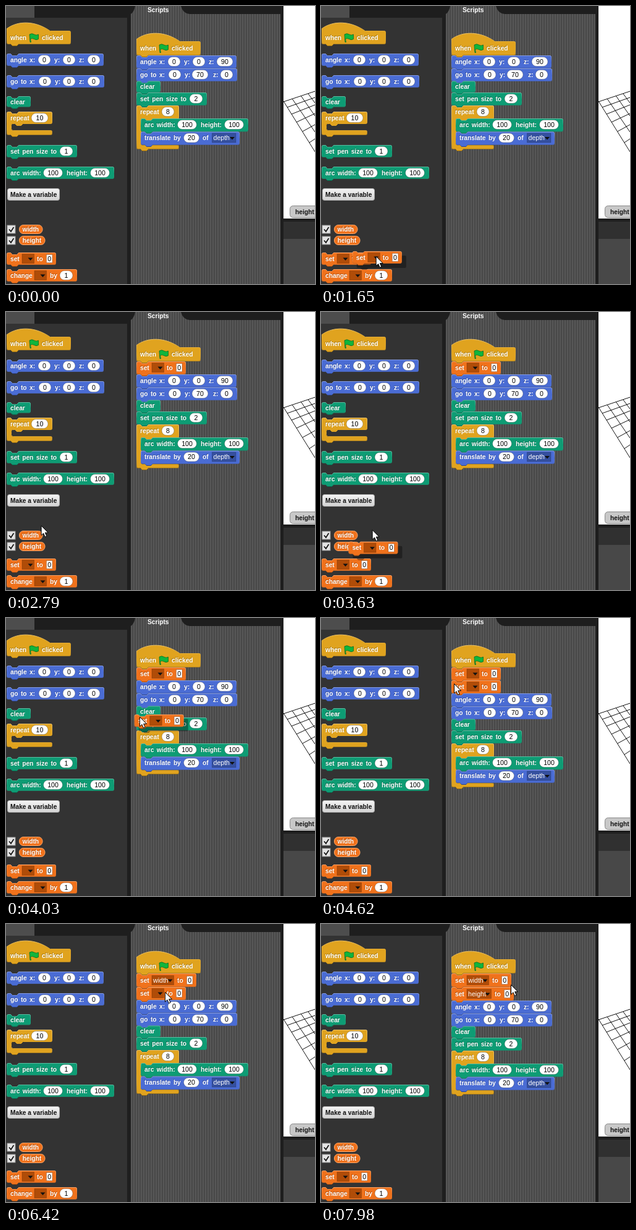
Animation, 500 px wide and 450 px high, one loop 8000 ms. Source, as an HTML page:

```html
<!DOCTYPE html>
<html lang="en">
<head>
<meta charset="utf-8">
<title>Block editor</title>
<style>
  html, body { margin: 0; width: 100%; height: 100%; overflow: hidden; background: #1e1e1e; }
  svg { display: block; width: 500px; height: 450px; }
  text { font-family: "Liberation Sans", Arial, sans-serif; font-size: 10.2px; white-space: pre; }
  .label { font-weight: bold; word-spacing: 1.6px; }
  .value { font-size: 10.6px; }
</style>
</head>
<body>
<svg id="stage" viewBox="0 0 500 450" xmlns="http://www.w3.org/2000/svg"></svg>
<script>
const LOOP = 8000;
const BLUE = '#4a6cd4', GREEN = '#0e9c74', GOLD = '#e0a31f', ORANGE = '#f0721c';
const DARK = { [BLUE]: '#35509f', [GREEN]: '#086a4e', [GOLD]: '#a87a12', [ORANGE]: '#b04c08' };

// ---- small drawing helpers ----
const rect = (x, y, w, h, fill, more = '') =>
  `<rect x="${x}" y="${y}" width="${w}" height="${h}" fill="${fill}" ${more}/>`;
const path = (d, fill, more = '') => `<path d="${d}" fill="${fill}" ${more}/>`;
const text = (x, y, str, fill, cls = 'label', more = '') =>
  `<text x="${x}" y="${y}" fill="${fill}" class="${cls}" ${more}>${str}</text>`;
const at = (x, y, body, id = '') => `<g ${id && `id="${id}"`} transform="translate(${x} ${y})">${body}</g>`;

// ---- block outlines ----
const notch = 'l3,3 h7 l3,-3';
const bump = 'l-3,3 h-7 l-3,-3';
const foot = (w, h) => `V${h - 2} Q${w},${h} ${w - 2},${h} H19 ${bump} H2 Q0,${h} 0,${h - 2} Z`;
const head = w => `M0,2 Q0,0 2,0 H6 ${notch} H${w - 2} Q${w},0 ${w},2`;
const stackShape = (w, h) => `${head(w)} ${foot(w, h)}`;
const hatShape = (w, h) => `M0,9 C18,-4 46,-4 70,13 H${w - 2} Q${w},13 ${w},15 ${foot(w, h)}`;
const loopShape = (top, mouth) => (w, h) =>
  `${head(w)} V${top - 2} Q${w},${top} ${w - 2},${top} H26 ${bump} H9 Q7,${top} 7,${top + 3}
   V${top + mouth - 3} Q7,${top + mouth} 10,${top + mouth} H${w - 2} Q${w},${top + mouth} ${w},${top + mouth + 2} ${foot(w, h)}`;

// ---- block contents, positioned relative to the block ----
const label = (x, str) => (cy, color) =>
  text(x - .7, cy + 2.9, str, DARK[color]) + text(x, cy + 3.6, str, '#fff');
const num = (cx, w, str) => cy =>
  rect(cx - w / 2, cy - 7.5, w, 15, '#fff', 'rx="7.5" stroke="#000" stroke-opacity=".3" stroke-width=".8"') +
  text(cx, cy + 3.8, str, '#000', 'value', 'text-anchor="middle"');
const slot = (x, str) => cy =>
  rect(x, cy - 6.5, 9.5, 13, '#fff', 'stroke="#000" stroke-opacity=".3" stroke-width=".8"') +
  text(x + 1.8, cy + 3.8, str, '#000', 'value');
const drop = (x, w, str = '') => (cy, color) =>
  rect(x, cy - 7.5, w, 15, DARK[color], 'stroke="#000" stroke-opacity=".2"') +
  text(x + 2, cy + 3.8, str, '#fff', 'value') +
  path(`M${x + w - 10},${cy - 1.5} h8 l-4,4.5 z`, '#111');
const flag = x => cy =>
  path(`M${x + 1},${cy - 5} q4,-2.5 7.5,0 q3.5,2.3 7,0 v7.5 q-3.5,2.4 -7,0 q-3.5,-2 -6,0 l1,5 h-1.5 z`,
    '#10b53c', 'stroke="#0b6b20" stroke-width=".8"');

function block(x, y, w, h, color, parts, { cy = 10, shape = stackShape, id = '' } = {}) {
  const edge = shape(w - 1, h - 1);
  return at(x, y, `<g transform="translate(.5 .5)">${path(edge, color, `stroke="${color}"`)}
    ${path(edge, 'none', 'stroke="url(#bevel)"')}</g>` + parts.map(p => p(cy, color)).join(''), id);
}

const hat = (x, y, h) => block(x, y, 104, h, GOLD, [label(6, 'when'), flag(36), label(57, 'clicked')],
  { cy: 24, shape: hatShape });
const setVar = (x, y, name = '', id = '', h = 21) => {
  const grow = { '': 0, width: 17, height: 21 }[name];
  const tall = grow ? 1 : 0;
  return block(x, y, 80 + grow, h + tall, ORANGE,
    [label(6, 'set'), drop(25, 19.5 + grow - tall, name), label(49 + grow, 'to'), slot(64.5 + grow, '0')], { cy: 10 + tall, id });
};
const arc = (x, y, h) => block(x, y, 174, h, GREEN,
  [label(6, 'arc width:'), num(75, 31, 100), label(97, 'height:'), num(151, 31, 100)]);
const pen = (x, y, h, n) => block(x, y, 114, h, GREEN, [label(6, 'set pen size to'), num(96.5, 21, n)]);
const clear = (x, y, h) => block(x, y, 39, h, GREEN, [label(6, 'clear')], { cy: 9 });

function watched(y, name, w) {
  return rect(2, y, 13, 13, '#e4e4e4', 'stroke="#999"') +
    path(`M5,${y + 6.5} l3,3.5 l4.5,-7`, 'none', 'stroke="#111" stroke-width="1.7"') +
    rect(21.5, y - .5, w, 14, ORANGE, 'rx="6.5" stroke="#ffa869"') +
    at(0, 0, label(26.5, name)(y + 6.5, ORANGE));
}

// ---- panes ----
function panes() {
  const grid = [
    [449, 155, 500, 138], [455, 164, 500, 148], [462, 175, 500, 160], [470, 188, 500, 174], [480, 203, 500, 192], [491, 221, 500, 215],
    [449, 154, 500, 236], [463, 150, 500, 204], [477, 145, 500, 178], [489, 142, 500, 157]
  ].map(([a, b, c, d]) => `M${a},${b} L${c},${d}`).join('');
  return rect(0, 0, 500, 450, '#1e1e1e') + rect(0, 0, 46, 19, '#4d4d4d') + rect(0, 19, 196, 431, '#333') +
    rect(202, 13, 242, 437, 'url(#stripes)') +
    path('M202,13 Q207,10 209,0 H283 Q286,12 297,13 Z', 'url(#stripes)') +
    text(229, 10, 'Scripts', '#fff') +
    rect(449, 0, 51, 344, '#fff') + path(grid, 'none', 'stroke="#111"') +
    rect(459.5, 323.5, 60, 19, '#c8c8c8', 'rx="5" stroke="#888"') + text(468, 337, 'height', '#111') +
    rect(449, 349, 51, 28, '#303030') + rect(449, 377, 51, 73, '#484848');
}

function palette() {
  return hat(1, 27, 35) +
    block(1, 77, 157, 20, BLUE, [label(6, 'angle x:'), num(61, 20, 0), label(77, 'y:'), num(101, 20, 0), label(117, 'z:'), num(141, 20, 0)]) +
    block(1, 112, 158, 20, BLUE, [label(6, 'go to x:'), num(62, 20, 0), label(78, 'y:'), num(101, 20, 0), label(117, 'z:'), num(141, 20, 0)]) +
    clear(1, 146, 17.5) +
    block(1, 171, 74, 38, GOLD, [label(6, 'repeat'), num(53.5, 27, 10)], { shape: loopShape(19, 11) }) +
    pen(1, 225, 20, 1) + arc(1, 260, 20) +
    rect(2.5, 295.5, 84, 19, 'url(#button)', 'rx="3" stroke="#aaa"') + text(7, 308.8, 'Make a variable', '#111', 'label', 'style="word-spacing:0"') +
    watched(355, 'width', 37.5) + watched(373, 'height', 41.5) +
    setVar(1, 399, '', '', 20) +
    block(1, 426, 114, 20, ORANGE, [label(6, 'change'), drop(45, 19.5), label(70, 'by'), num(96.5, 21, 1)]);
}

function script() {
  const rest =
    block(211, 80, 162, 21, BLUE, [label(6, 'angle x:'), num(61, 20, 0), label(77, 'y:'), num(101, 20, 0), label(117, 'z:'), num(143, 26, 90)]) +
    block(211, 101, 163, 21, BLUE, [label(6, 'go to x:'), num(62, 20, 0), label(78, 'y:'), num(103, 26, 70), label(124, 'z:'), num(146, 20, 0)]) +
    clear(211, 121.5, 18.5) + pen(211, 140, 21, 2) +
    block(211, 161, 69, 71, GOLD, [label(6, 'repeat'), num(51, 20, 8)], { shape: loopShape(21, 43) }) +
    arc(218, 182, 21.5) +
    block(218, 203.5, 160, 21.5, BLUE, [label(6, 'translate by'), num(82, 25, 20), label(100, 'of'), drop(115.5, 38.5, 'depth')]);
  return hat(211, 44, 36) + setVar(211, 80, '', 'first') + setVar(211, 80, 'width', 'firstNamed') +
    setVar(211, 101, '', 'second') + setVar(211, 102, 'height', 'secondNamed') + at(0, 0, rest, 'rest');
}

const ITEMS = ['', 'width', 'height'], ROW = 15.5;
const menu = rect(2, 2, 50, 49, '#000', 'rx="4" opacity=".45"') +
  rect(.5, .5, 49, 48, '#fff', 'rx="4" stroke="#777"') +
  rect(2, 0, 46, ROW, '#c0c0c0', 'id="hover"') +
  ITEMS.map((s, i) => text(6, 13 + i * ROW, s, '#000', 'value')).join('');

const stage = document.getElementById('stage');
stage.innerHTML = `<defs>
    <linearGradient id="bevel" x2="0" y2="1"><stop offset="0" stop-color="#fff" stop-opacity=".32"/>
      <stop offset=".5" stop-color="#fff" stop-opacity="0"/><stop offset="1" stop-color="#000" stop-opacity=".35"/></linearGradient>
    <linearGradient id="button" x2="0" y2="1"><stop offset="0" stop-color="#f4f4f4"/><stop offset="1" stop-color="#d2d2d2"/></linearGradient>
    <pattern id="stripes" width="4" height="4" patternUnits="userSpaceOnUse">
      ${rect(0, 0, 4, 4, '#575757')}${rect(0, 0, 2, 4, '#484848')}</pattern>
  </defs>` + panes() + palette() + script() +
  rect(211, 0, 80, 5, '#fff', 'id="hint" rx="2"') +
  at(0, 0, path(stackShape(80, 20), '#000', 'opacity=".35" transform="translate(7 7)"') + setVar(0, 0, '', '', 20), 'carried') +
  at(0, 0, menu, 'menu') +
  at(0, 0, path('M.5,.5 V16 L4,12.7 L6.6,18.4 L9.2,17.2 L6.7,11.7 H11.5 Z', '#fff', 'stroke="#000"'), 'cursor');

const el = {};
stage.querySelectorAll('g[id], rect[id]').forEach(n => el[n.id] = n);
const show = (n, on) => n.setAttribute('display', on ? 'inline' : 'none');
const move = (n, x, y) => n.setAttribute('transform', `translate(${x.toFixed(2)} ${y.toFixed(2)})`);

// ---- pointer path: time, x, y ----
const TRACK = [
  [610, 457, 236], [770, 300, 310], [930, 120, 395], [1050, 18, 431], [1140, 1, 427], [1340, 8, 411],
  [1540, 8, 411], [1570, 22, 411], [1610, 57, 409], [1650, 88, 405], [1800, 172, 330], [1950, 215, 230], [2120, 221, 140], [2330, 217, 91],
  [2530, 217, 91], [2660, 140, 215], [2790, 57, 345], [2950, 10, 395], [3190, 8, 409],
  [3320, 8, 409], [3480, 18, 404], [3590, 51, 382], [3630, 82, 353], [3800, 175, 240], [3950, 213, 175], [4110, 217, 147], [4310, 215, 106],
  [4620, 215, 106], [4980, 249, 88], [5240, 249, 88], [5500, 262, 111], [5780, 262, 111],
  [6000, 272, 118], [6420, 257, 110], [6570, 254, 110], [6650, 244, 111], [6910, 244, 111], [7390, 262, 147], [7550, 262, 147], [7980, 307, 98]
];

// Monotone cubic, so rests stay still and nothing overshoots.
function slope(i, k) {
  if (i < 1 || i > TRACK.length - 2) return 0;
  const [p, q, r] = TRACK.slice(i - 1, i + 2);
  const a = (q[k] - p[k]) / (q[0] - p[0]), b = (r[k] - q[k]) / (r[0] - q[0]);
  return a * b > 0 ? 2 * a * b / (a + b) : 0;
}
function pointer(t) {
  const last = TRACK.length - 1;
  if (t <= TRACK[0][0]) return TRACK[0].slice(1);
  if (t >= TRACK[last][0]) return TRACK[last].slice(1);
  const i = TRACK.findIndex(p => p[0] > t) - 1;
  const a = TRACK[i], b = TRACK[i + 1], d = b[0] - a[0], u = (t - a[0]) / d;
  return [1, 2].map(k => {
    const s = u * u * (3 - 2 * u);
    return a[k] + (b[k] - a[k]) * s + d * (slope(i, k) * u * (1 - u) ** 2 - slope(i + 1, k) * u * u * (1 - u));
  });
}

// ---- events ----
const DRAGS = [{ from: 1570, to: 2550, grip: [7, 12] }, { from: 3340, to: 4620, grip: [7, 10] }];
const MENUS = [{ from: 5240, to: 5800, x: 248, y: 88 }, { from: 6910, to: 7570, x: 244, y: 111 }];
const during = (list, t) => list.find(e => t >= e.from && t < e.to);

function drawDrag(t, shift) {
  const drag = during(DRAGS, t);
  show(el.carried, drag);
  let best = null;
  if (drag) {
    const [px, py] = pointer(t - 40);
    const x = px - drag.grip[0], y = py - drag.grip[1];
    move(el.carried, x, y);
    const joints = [[80, 104], [101 + shift, 162], [122 + shift, 163], [140 + shift, 39], [161 + shift, 114]];
    if (shift) joints.push([101, 80]);
    const far = j => Math.hypot(x - 211, y - j[0]);
    best = joints.sort((a, b) => far(a) - far(b))[0];
    if (far(best) > 22) best = null;
  }
  show(el.hint, best);
  if (best) {
    el.hint.setAttribute('y', best[0] - 1);
    el.hint.setAttribute('width', best[1]);
  }
}

function draw(t) {
  const one = t >= DRAGS[0].to, two = t >= DRAGS[1].to;
  const named = t >= MENUS[0].to, both = t >= MENUS[1].to;
  show(el.first, one && !named);
  show(el.firstNamed, named);
  show(el.second, two && !both);
  move(el.second, 211, named ? 102 : 101);
  show(el.secondNamed, both);
  const shift = 21 * one + 21 * two + named + both;
  move(el.rest, 0, shift);
  drawDrag(t, shift);

  const [x, y] = pointer(t);
  show(el.cursor, t >= TRACK[0][0]);
  move(el.cursor, x, y);

  const open = during(MENUS, t);
  show(el.menu, open);
  if (open) {
    move(el.menu, open.x, open.y);
    const row = Math.max(0, Math.min(2, Math.floor((y - open.y - 1.5) / ROW)));
    el.hover.setAttribute('y', 1.5 + row * ROW);
  }
}

const start = performance.now();
function tick() {
  draw((performance.now() - start) % LOOP);
  requestAnimationFrame(tick);
}
tick();
</script>
</body>
</html>
```
